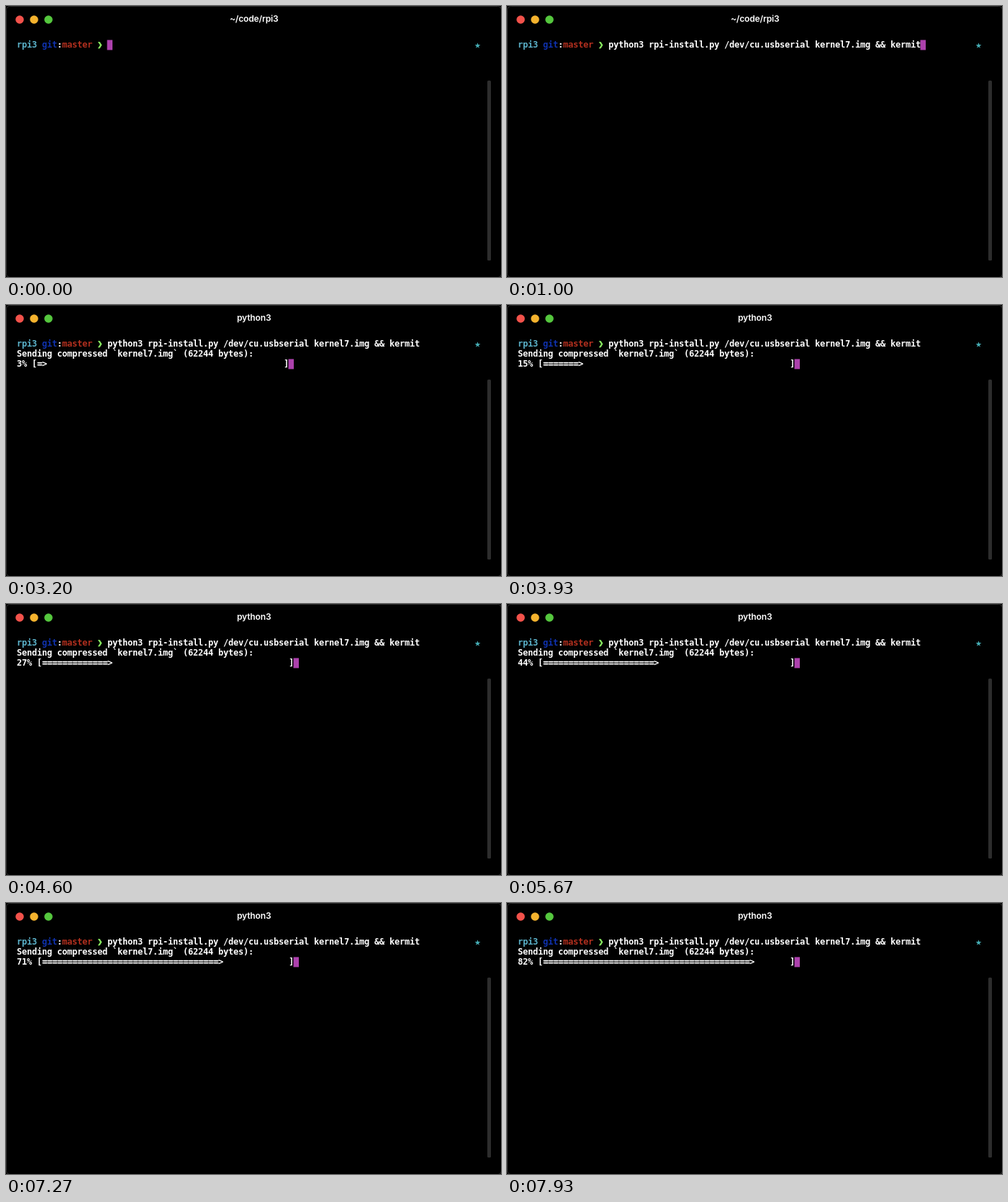
An HTML page that plays this animation: 688x378 px, repeating every 8000 ms.

```html
<!DOCTYPE html>
<html lang="en">
<head>
<meta charset="utf-8">
<title>Terminal</title>
<style>
  html, body { margin: 0; width: 100%; height: 100%; overflow: hidden; background: #000; }
  svg { display: block; width: 688px; height: 378px; }
  text { white-space: pre; }
  #cells text { font: bold 12px "DejaVu Sans Mono", "DejaVu Sans", monospace; fill: #fff; }
  #title { font: 600 12px Inter, sans-serif; letter-spacing: -.15px; fill: #fff; text-anchor: middle; }
</style>
</head>
<body>
<svg viewBox="0 0 688 378">
  <rect width="688" height="378" fill="#000"/>
  <rect x=".5" y=".5" width="688" height="378" rx="5" fill="none" stroke="#2e2e2e"/>
  <circle cx="19" cy="19" r="5.75" fill="#f2524b"/>
  <circle cx="39" cy="19" r="5.75" fill="#f5b32e"/>
  <circle cx="59" cy="19" r="5.75" fill="#55c73e"/>
  <text id="title" x="344.7" y="22"></text>
  <rect x="669" y="104" width="5" height="251" rx="1.5" fill="#2d2d2d"/>
  <polygon id="star" fill="#45adb4"/>
  <rect id="cursor" width="7.5" height="14" fill="#ac41ac"/>
  <g id="cells"></g>
</svg>
<script>
const LOOP = 8000, RECALL = 670, ENTER = 1400, SEND = 3000;
const CELL = 7, LINE = 14, LEFT = 15, TOP = 47, BASELINE = 11;
const PROMPT_COLS = 18, BAR_COLS = 49;
const COMMAND = "python3 rpi-install.py /dev/cu.usbserial kernel7.img && kermit";

const $ = id => document.getElementById(id);
const cellX = col => LEFT + col * CELL;

function addText(row, color) {
  const el = document.createElementNS("http://www.w3.org/2000/svg", "text");
  el.setAttribute("y", TOP + row * LINE + BASELINE);
  if (color) el.style.fill = color;
  return $("cells").appendChild(el);
}

// Each character sits in its own terminal cell.
function put(el, col, string, shift = 0) {
  el.textContent = string;
  el.setAttribute("x", Array.from(string, (_, i) => cellX(col + i) + shift).join(" "));
}

function moveCursor(col, row) {
  $("cursor").setAttribute("x", cellX(col) - 0.5);
  $("cursor").setAttribute("y", TOP + row * LINE + 0.4);
}

[
  [0, "rpi3", "#5bb2ca"],
  [5, "git", "#0f32b0"],
  [8, ":", "#fff"],
  [9, "master", "#b5301f"]
].forEach(([col, string, color]) => put(addText(0, color), col, string));

const arrow = addText(0, "#8bee62");
arrow.style.stroke = "#8bee62";
arrow.style.strokeWidth = 0.6;
put(arrow, 16, "❯");

$("star").setAttribute("points", Array.from({ length: 10 }, (_, i) => {
  const radius = i % 2 ? 1.6 : 4.1;
  const angle = (i / 5 - 0.5) * Math.PI;
  return `${655.5 + radius * Math.cos(angle)},${55.4 + radius * Math.sin(angle)}`;
}).join(" "));

const command = addText(0), message = addText(1);
const percentText = addText(2), fill = addText(2), fillJoin = addText(2), tail = addText(2);

function drawProgress(t) {
  const tick = Math.floor((t - SEND + 4) * 15 / 1000);
  const percent = Math.floor(0.25 + tick * 67 / 60);
  const done = Math.floor(percent / 2);
  const head = `${percent}% [`;
  const bar = "=".repeat(done);
  const rest = ">" + " ".repeat(BAR_COLS - done - 1) + "]";
  put(percentText, 0, head);
  put(fill, head.length, bar);
  put(fillJoin, head.length, bar, 0.8); // closes the gaps between cells
  put(tail, head.length + done, rest);
  moveCursor(head.length + BAR_COLS + 1, 2);
}

function draw() {
  const t = performance.now() % LOOP;
  const sending = t >= SEND;
  $("title").textContent = t < ENTER ? "~/code/rpi3" : "python3";
  put(command, PROMPT_COLS, t < RECALL ? "" : COMMAND);
  put(message, 0, sending ? "Sending compressed `kernel7.img` (62244 bytes):" : "");

  if (sending) {
    drawProgress(t);
  } else {
    [percentText, fill, fillJoin, tail].forEach(el => put(el, 0, ""));
    if (t >= ENTER) moveCursor(0, 1);
    else moveCursor(PROMPT_COLS + (t < RECALL ? 0 : COMMAND.length), 0);
  }
  requestAnimationFrame(draw);
}
draw();
</script>
</body>
</html>
```
